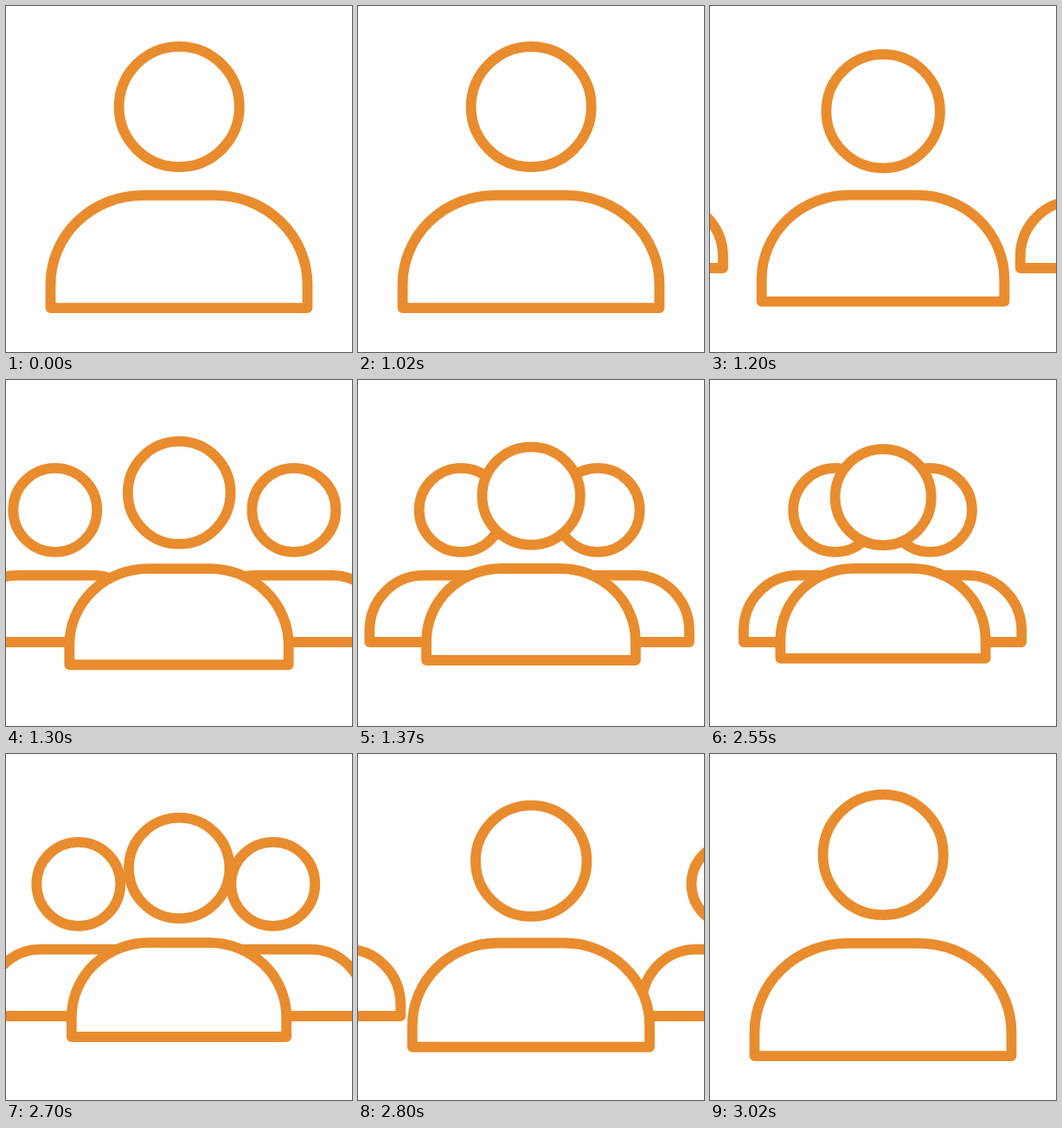
These frames come from a looping animation (400 by 400 pixels, 3.05 s). An HTML page with a canvas:

```html
<!DOCTYPE html>
<html lang="en">
<head>
<meta charset="utf-8">
<title>One person becomes a group</title>
<style>
html, body { margin: 0; width: 100%; height: 100%; overflow: hidden; background: #fff; }
canvas { display: block; }
</style>
</head>
<body>
<canvas id="stage" width="400" height="400"></canvas>
<script>
const ctx = document.getElementById('stage').getContext('2d');
const LOOP = 3050, STEP = 25, MOVE = 500;
const GATHER = 1000, PART = 2525;

const clamp = v => Math.min(1, Math.max(0, v));
const mix = (a, b, p) => a + (b - a) * p;

// cubic-bezier(0.6, 0, 0.4, 1), solved by bisection
function ease(x) {
  if (x <= 0 || x >= 1) return clamp(x);
  let lo = 0, hi = 1;
  for (let i = 0; i < 30; i++) {
    const s = (lo + hi) / 2, r = 1 - s;
    if (1.8 * s * r * r + 1.2 * s * s * r + s * s * s < x) lo = s;
    else hi = s;
  }
  return lo * lo * (3 - 2 * lo);
}

function paint() {
  ctx.fill();
  ctx.stroke();
}

function head(x, y, r) {
  ctx.beginPath();
  ctx.arc(x, y, r, 0, Math.PI * 2);
  paint();
}

// Shoulders: flat top, elliptical corners, square base
function body(x, top, half, height, rx, ry) {
  const bottom = top + height, flat = half - rx;
  ctx.beginPath();
  ctx.moveTo(x - half, bottom);
  ctx.lineTo(x - half, top + ry);
  ctx.ellipse(x - flat, top + ry, rx, ry, 0, Math.PI, Math.PI * 1.5);
  ctx.lineTo(x + flat, top);
  ctx.ellipse(x + flat, top + ry, rx, ry, 0, Math.PI * 1.5, Math.PI * 2);
  ctx.lineTo(x + half, bottom);
  ctx.closePath();
  paint();
}

function sidePerson(x) {
  body(x, 225.8, 105.8, 77.2, 62, 64);
  head(x, 150.3, 48.5);
}

function mainPerson(p) {
  const k = mix(1, 0.798, p);
  body(200, mix(218.9, 217.9, p), 148.5 * k, 130.2 * k, 106.5 * k, 103 * k);
  head(200.2, mix(116.5, 135.5, p), 69.6 * k);
}

function draw(ms) {
  // Picture advances in 25 ms steps on a 10 ms clock
  const clock = Math.floor(ms / 10) * 10 + 5;
  const t = Math.floor(clock / STEP) * STEP;
  const p = t < PART
    ? ease(clamp((t - GATHER) / MOVE))
    : 1 - ease(clamp((t - PART) / MOVE));

  ctx.fillStyle = '#fff';
  ctx.fillRect(0, 0, 400, 400);
  ctx.strokeStyle = '#e98c2e';
  ctx.lineWidth = 11.8;
  ctx.lineJoin = 'round';
  sidePerson(mix(-179.5, 145.5, p));
  sidePerson(mix(543.7, 253.7, p));
  mainPerson(p);
}

const start = performance.now();
function tick() {
  draw((performance.now() - start) % LOOP);
  requestAnimationFrame(tick);
}
tick();
</script>
</body>
</html>
```
